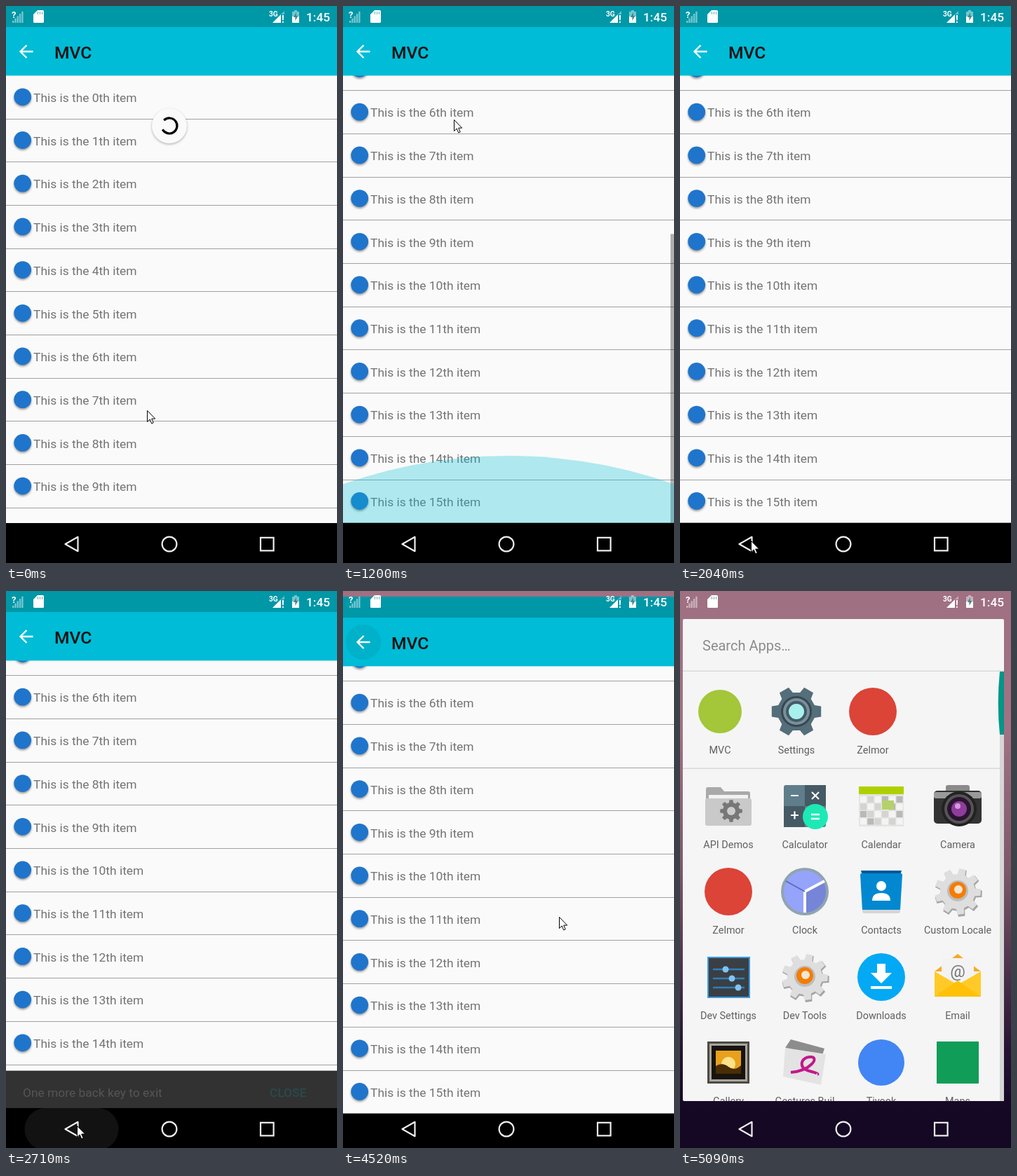
An HTML page that plays this animation: 472 by 795 pixels, repeating every 5620 ms.

```html
<!DOCTYPE html>
<html lang="en">
<head>
<meta charset="utf-8">
<title>MVC list</title>
<style>
html, body { margin: 0; width: 100%; height: 100%; overflow: hidden; background: #000; }
svg { display: block; width: 472px; height: 795px; font-family: Roboto, "Noto Sans", sans-serif; }
</style>
</head>
<body>
<svg id="stage" viewBox="0 0 472 795"></svg>
<script>
const LOOP = 5620, STEP = 132.9, PITCH = 61.7, SCROLL = 348.8;

// Cursor way-points: step, x, y. It moves straight between them.
const PATH = [[0, 201, 577], [4, 182, 618], [9, 158, 162], [15, 101, 763], [22, 101, 763],
  [24, 109, 235], [29, 33, 71], [33, 33, 71], [34, 308, 465], [36, 348, 729], [37, 362, 771]];

const R = (x, y, w, h, fill, more = '') => `<rect x="${x}" y="${y}" width="${w}" height="${h}" fill="${fill}" ${more}/>`;
const C = (x, y, r, fill, more = '') => `<circle cx="${x}" cy="${y}" r="${r}" fill="${fill}" ${more}/>`;
const P = (d, fill, more = '') => `<path d="${d}" fill="${fill}" ${more}/>`;
const L = (d, stroke, w, more = '') => P(d, 'none', `stroke="${stroke}" stroke-width="${w}" ${more}`);
const T = (x, y, s, size, fill, more = '') => `<text x="${x}" y="${y}" font-size="${size}" fill="${fill}" ${more}>${s}</text>`;
const G = (id, body, more = '') => `<g id="${id}" ${more}>${body}</g>`;
const move = (x, y, body) => `<g transform="translate(${x} ${y})">${body}</g>`;
const times = (n, make) => Array.from({ length: n }, (_, i) => make(i)).join('');
const MID = 'text-anchor="middle"', MEDIUM = 'font-weight="500"', BOLD = 'font-weight="700"';
const SOFT = 'filter="url(#soft)"';

function gear(r, teeth, fill, turn = 0) {
  const corner = (a, k) => `${r * k * Math.sin(a)},${-r * k * Math.cos(a)} `;
  const pts = times(teeth, i => [[-.32, .76], [-.2, 1], [.2, 1], [.32, .76]]
    .map(([a, k]) => corner((i + a + turn) * 2 * Math.PI / teeth, k)).join(''));
  return `<polygon points="${pts}" fill="${fill}"/>`;
}

const cog = move(1, 2, gear(34, 9, '#a5a5a5', .3)) + gear(33, 9, '#dedede', .3) +
  C(0, -1, 15, '#bdbdbd') + C(0, -2, 12, '#f57c00') + C(1, -3, 6, '#f3e6d5');

const calendar = R(-32, -28, 64, 57, '#e4e4e2') + R(-32, -28, 64, 11, '#aed000') +
  times(24, i => R(-30 + i % 6 * 10.3, -14 + (i / 6 | 0) * 10.5, 9, 9, ['#f4f4f4', '#b9b9b7', '#d4d4d2'][i * 5 % 7 % 3])) +
  R(1, -8, 17, 13, '#b5d16a');

const knobs = times(3, i => {
  const y = -11 + i * 13;
  return L(`M-22 ${y}h45`, '#2f7fb8', 2.5) + C(-4 + i * 9, y, 4.5, '#7fc4f2');
});

// Drawn around their own centre.
const ICONS = {
  'MVC': C(0, 0, 31, '#a4c639'),
  'Settings': gear(36, 6, '#546e7a', .5) + C(0, 0, 25, '#546e7a') + C(0, 0, 22, '#37474f') + C(0, 0, 19, '#78909c') +
    C(0, 0, 15, '#455a64') + C(0, 0, 11, '#a7f0ee'),
  'API Demos': P('M-32 -24q0 -3 3 -3h18l5 6h34q3 0 3 3v44h-63z', '#a9a9a9') + R(-28, -16, 56, 20, '#f2f2f2') +
    R(-33, -11, 66, 39, '#c9c9c9', 'rx="3"') + move(4, 7, gear(16, 8, '#777') + C(0, 0, 6, '#ccc')),
  'Calculator': R(-30, -30, 60, 60, '#607d8b', 'rx="3"') + R(0, -30, 30, 30, '#455a64') + R(-30, 0, 30, 30, '#455a64') +
    L('M-20 -15h11M10 -20l10 10m0 -10l-10 10M-20 13h11m-5.5 -5.5v11', '#fff', 2.2) + C(15, 15, 18, '#1de9b6') + L('M9 12h12M9 18h12', '#fff', 2.4),
  'Calendar': calendar,
  'Camera': R(-17, -30, 34, 14, '#8b8b8b', 'rx="3"') + R(-34, -22, 68, 47, '#333', 'rx="5"') + R(-34, -20, 68, 9, '#9a9a9a', 'rx="3"') +
    C(2, 4, 25, '#222') + C(2, 4, 21, '#555') + C(2, 4, 17, '#2a1430') + C(2, 4, 11, '#8e3d9b') + C(0, 0, 4, '#d59ade'),
  'Zelmor': C(0, 0, 34, '#db4437'),
  'Clock': C(0, 0, 34, '#90a4ae') + C(0, 0, 30, '#95a3fb') + P('M0 0L26 -15A30 30 0 0 1 0 30z', '#7685d8') +
    L('M0 30V0L28 -15', '#fff', 4) + L('M0 0L-27 -15', '#5c6bc0', 2),
  'Contacts': R(-27, 20, 54, 11, '#d5d5d5', 'rx="3"') + P('M-29 -30h58l-3 10h-52z', '#01579b') + P('M-30 -24q0 -2 3 -2h54q3 0 3 2l-3 50h-54z', '#0288d1') +
    C(0, -8, 7, '#fff') + P('M-13 13q0 -11 13 -11t13 11z', '#fff'),
  'Custom Locale': cog,
  'Dev Settings': R(-29, -28, 59, 57, '#3a3f44', 'stroke="#3b9be0" stroke-width="2"') + knobs,
  'Dev Tools': cog,
  'Downloads': C(0, 0, 34, '#03a9f4') + P('M-6 -19h12v13h9l-15 15l-15 -15h9z', '#fff') + R(-15, 13, 30, 4, '#fff'),
  'Email': P('M-33 -8L0 -33L33 -8z', '#f9a825') + R(-23, -27, 46, 42, '#f3f3f3') + T(0, 0, '@', 24, '#777', MID) +
    P('M-33 -8L0 11L33 -8V28h-66z', '#ffca28') + P('M-33 28L0 5L33 28z', '#ffc107'),
  'Gallery': R(-30, -30, 60, 60, '#4d4a45') + R(-27, -27, 54, 54, '#aaa69d') + R(-24, -24, 48, 48, '#171410') + R(-18, -17, 36, 33, '#e8a11c') +
    C(0, 2, 10, '#ffe28a') + P('M-18 5q9 -6 18 1t18 -2V16h-36z', '#4a2d05'),
  'Gestures Buil': P('M-20 -33L28 -20L24 -8L-28 -21z', '#8c8c8c') + P('M-28 -21L30 -12L23 32L-31 20z', '#e3e3e3') +
    L('M-20 14C8 12 22 -8 8 -8S-10 8 6 12S18 17 18 17', '#c2188b', 4),
  'Tivook': C(0, 0, 33, '#4285f4'),
  'Maps': R(-30, -30, 60, 60, '#0f9d58')
};

const app = (name, x, y) => move(x, y, ICONS[name] + T(0, 59.5, name, 14.4, '#606060', MID));
const recent = ['MVC', 'Settings', 'Zelmor'], all = Object.keys(ICONS).slice(2);

const launcher = R(0, 0, 472, 795, 'url(#wall)') + G('sheet',
  R(4, 40, 458, 688, '#f5f5f5', 'rx="2"') + T(32, 85, 'Search Apps…', 20, '#8c8c8c') +
  R(4, 113.5, 458, 1.5, '#d9d9d9') + R(4, 252.5, 458, 1.5, '#d9d9d9') + R(456, 115, 6, 613, '#d6d6d6') +
  P('M462 115h-6q-4.5 45 0 90h6z', '#009688') +
  recent.map((name, i) => app(name, 57 + i * 109, 172)).join('') +
  all.map((name, i) => app(name, 69 + i % 4 * 109, 307 + (i / 4 | 0) * 122)).join(''),
  'clip-path="url(#panel)"');

const row = i => move(0, i * PITCH, C(23.7, 131.8, 12.4, '#000', 'opacity=".38" ' + SOFT) + C(23.7, 129.8, 12.4, '#1f75cb') +
  T(39, 137, `This is the ${i}th item`, 17.4, '#737373') + R(0, 160.55, 472, 1, '#a0a0a0', 'shape-rendering="crispEdges"'));

const spinner = G('spin', C(0, 1.5, 25.5, '#000', 'opacity=".22" ' + SOFT) + C(0, 0, 25, '#fafafa') +
  G('arc', L('M-7.8 -7.8A11 11 0 1 1 -9.7 5.2', '#000', 3.2)));

const snackbar = G('snack', R(0, 678, 472, 60, '#323232') +
  G('words', T(24, 715, 'One more back key to exit', 17.4, '#fff') + T(376, 715, 'CLOSE', 17.3, '#00bcd4', MEDIUM)));

const screen = G('win',
  R(0, 0, 472, 738, '#fafafa') +
  G('body', G('list', times(10, row) + G('more', times(6, i => row(i + 10)))) + R(467, 100, 5, 412.5, '#000', 'id="bar"') +
    C(236, 1446, 708, '#00bcd4', 'id="glow"') + spinner + snackbar, 'clip-path="url(#view)"') +
  R(0, 0, 472, 30, '#0097a7') + R(0, 30, 472, 69.4, '#00bcd6') + C(29, 65, 25, '#000', 'id="up"') +
  L('M38.5 65H21M29.5 56L20.5 65L29.5 74', '#fff', 2.3) + T(69, 75, 'MVC', 24.6, '#111', MEDIUM) +
  R(0, 738, 472, 70, '#000'));

const system =
  R(26.5, 738, 134, 60, '#fff', 'id="press" rx="30"') +
  times(5, i => R(9 + i * 3.3, 21 - i * 3.3, 2.4, 3 + i * 3.3, '#fff', 'opacity=".45"')) + T(8, 17, '?', 13, '#fff', BOLD) +
  P('M45 6H52.5Q54 6 54 7.5V22.5Q54 24 52.5 24H40.5Q39 24 39 22.5V12z', '#fff') +
  L('M45.5 8v4M48.5 8v4M51.5 8v4', '#6aa9b2', 1) +
  T(375, 15, '3G', 10.2, '#fff', BOLD) + P('M392 12V24H380z', '#fff') + P('M397 7V12H392z', '#fff', 'opacity=".4"') +
  T(393, 24, '!', 14, '#fff', BOLD) +
  P('M411 6h4v2h3v16h-10v-16h3z', '#fff', 'opacity=".45"') + R(408, 15, 10, 9, '#fff') + P('M414 9l-4 7h2.5v5l4 -7h-2.5z', '#47848c') +
  T(428, 22, '1:45', 17.3, '#fff', MEDIUM) +
  L('M84.5 768L102.5 757.8V778.2z', '#eee', 2.2, 'stroke-linejoin="round"') +
  C(233, 768, 10.4, 'none', 'stroke="#eee" stroke-width="2.2"') +
  R(363, 758.8, 18.6, 18.6, 'none', 'stroke="#eee" stroke-width="2.2"') +
  P('M.5 .5V16.5L4.2 13L6.7 18.9L9.2 17.8L6.7 12.1H11.7z', '#fff', 'id="cursor" stroke="#000" stroke-width="1"');

const shades = [[0, '#9f7081'], [.25, '#a07284'], [.5, '#7d5869'], [.82, '#271433'], [.93, '#150824']];
document.getElementById('stage').innerHTML = `<defs>
  <linearGradient id="wall" x2="0" y2="1">${shades.map(([o, c]) => `<stop offset="${o}" stop-color="${c}"/>`).join('')}</linearGradient>
  <clipPath id="view">${R(0, 99, 472, 639, '#000')}</clipPath>
  <clipPath id="panel">${R(4, 40, 458, 688, '#000')}</clipPath>
  <filter id="soft" x="-30%" y="-30%" width="160%" height="160%"><feGaussianBlur stdDeviation="1.5"/></filter>
  </defs>` + launcher + screen + system;

const set = (id, attrs) => {
  const node = document.getElementById(id);
  for (const k in attrs) node.setAttribute(k, attrs[k]);
};
const shown = yes => yes ? 'visible' : 'hidden';
const smooth = p => p * p * (3 - 2 * p);

function pointAt(n) {
  const i = PATH.findIndex(p => p[0] > n);
  if (i < 0) return PATH[PATH.length - 1].slice(1);
  const [a, ax, ay] = PATH[i - 1], [b, bx, by] = PATH[i], f = (n - a) / (b - a);
  return [ax + (bx - ax) * f, ay + (by - ay) * f];
}

// n counts the even steps at which the picture changes.
function draw(n) {
  const ramp = (a, b) => Math.min(1, Math.max(0, (n - a) / (b - a)));
  const pulse = (a, b, c, d) => ramp(a, b) * (1 - ramp(c, d));

  const scroll = SCROLL * smooth(ramp(4, 9));
  const glow = pulse(8, 9, 9, 12);
  const drop = 60 * ((1 - ramp(18, 21)) ** 2 + smooth(ramp(31.8, 33)));
  const grow = .84 + .16 * ramp(17, 19);
  const up = ramp(32, 34);

  set('cursor', { transform: `translate(${pointAt(n)})`, visibility: shown(n < 38) });
  set('list', { transform: `translate(0 ${-scroll})` });
  set('more', { display: n < 1 ? 'none' : 'inline' });
  set('bar', { y: 100 + scroll * .646, opacity: .3 * (pulse(0, 1, 2, 4) + pulse(4, 5, 12, 14)) });
  set('spin', { transform: `translate(233 171) scale(${1 - ramp(2, 4)})` });
  set('arc', { transform: `rotate(${n * 46})` });
  set('glow', { cy: 1446 - 96 * glow, opacity: .3 * glow });
  set('snack', { transform: `translate(0 ${drop})` });
  set('words', { opacity: pulse(19.8, 21, 31.6, 32.6) });
  set('press', { x: 93.5 - 67 * grow, width: 134 * grow, opacity: .07 * pulse(17, 19, 20, 21) });
  set('up', { r: 25 * up, opacity: .06 * up });
  set('win', { transform: `translate(0 ${8 * ramp(33, 34)})`, visibility: shown(n < 35) });
}

const start = performance.now();
function loop() {
  draw(Math.floor((performance.now() - start) % LOOP / STEP));
  requestAnimationFrame(loop);
}
loop();
</script>
</body>
</html>
```
